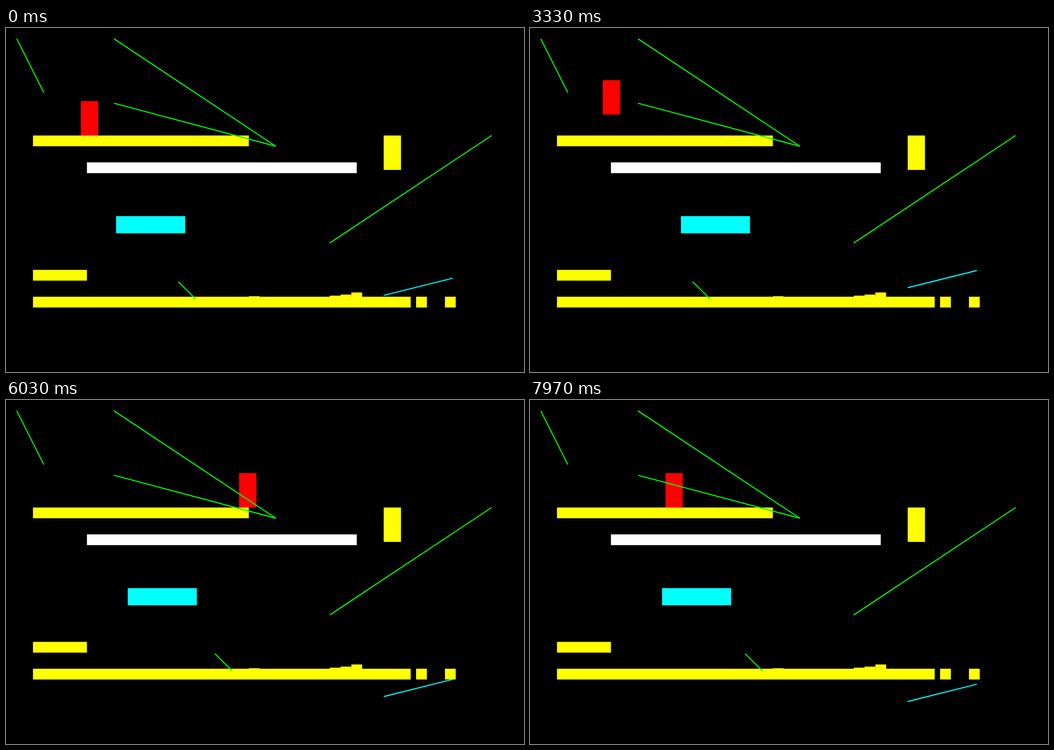
Recreate the animation shown at these times as an HTML page with a canvas. Size 917x611 px, loop 8 s.

```html
<!DOCTYPE html>
<html>
<head>
<meta charset="utf-8">
<style>
html, body { margin: 0; width: 100%; height: 100%; overflow: hidden; background: #000; }
canvas { display: block; }
</style>
</head>
<body>
<canvas id="stage" width="917" height="611"></canvas>
<script>
const ctx = document.getElementById('stage').getContext('2d');
const WORLD_W = 960, WORLD_H = 640;
const LOOP = 8, FPS = 30;
const WALK_SPEED = 148, GRAVITY = 158, GROUND = 136;

ctx.scale(917 / WORLD_W, 611 / WORLD_H);
ctx.lineWidth = 2;

function rect(color, x, y, w, h) {
  ctx.fillStyle = color;
  ctx.fillRect(x, y, w, h);
}

function line(color, x, y, dx, dy) {
  ctx.strokeStyle = color;
  ctx.beginPath();
  ctx.moveTo(x, y);
  ctx.lineTo(x + dx, y + dy);
  ctx.stroke();
}

const bar = (x, y, w, color = '#ff0') => rect(color, x, y, w, 20);

function drawLevel() {
  bar(50, 200, 400);
  bar(50, 450, 100);
  bar(50, 500, 700);
  bar(760, 500, 20);
  bar(813.5, 500, 20);
  bar(450, 499, 20);
  // Stairs whose height doubles with each step
  for (let i = 0; i < 3; i++) bar(600 + 20 * i, 500 - 2 ** (i + 1), 20);
  rect('#ff0', 700, 200, 32, 64);
  bar(150, 250, 500, '#fff');
}

function drawSlopes() {
  line('#0f0', 20, 20, 50, 100);
  line('#0f0', 200, 20, 300, 200);
  line('#0f0', 200, 140, 300, 80);
  line('#0f0', 600, 400, 300, -200);
}

// Distance walked at time t while a direction is held from start to end
const held = (t, start, end) =>
  WALK_SPEED * Math.max(0, Math.min(t, end) - start);

const playerX = t => 138.8
  - held(t, 2.45, 2.59)
  + held(t, 3.217, 3.33)
  + held(t, 3.392, 5.4)
  - held(t, 6.744, LOOP);

const jump = (t, peak, height) =>
  Math.max(0, height - GRAVITY * (t - peak) ** 2);

const playerY = t => GROUND - jump(t, 3.873, 85) - jump(t, 7.38, 21);

function draw(t) {
  const phase = 3 * (t - 2.246);
  const swing = Math.sin(phase) ** 2;

  rect('#000', 0, 0, WORLD_W, WORLD_H);
  drawLevel();
  rect('#0ff', 240 - 40 * Math.cos(phase), 350, 128, 32);
  rect('#f00', playerX(t), playerY(t), 32, 64);
  drawSlopes();
  line('#0f0', 300 + 100 * swing, 472, 32, 32);
  line('#0ff', 700, 482 + 80 * swing, 128, -32);
}

const start = performance.now();
function tick() {
  const t = (performance.now() - start) / 1000 % LOOP;
  // The small lead absorbs rounding of frame times to 10 ms
  const frame = Math.min(LOOP * FPS - 1, Math.floor((t + 0.004) * FPS));
  draw(frame / FPS);
  requestAnimationFrame(tick);
}
tick();
</script>
</body>
</html>
```
